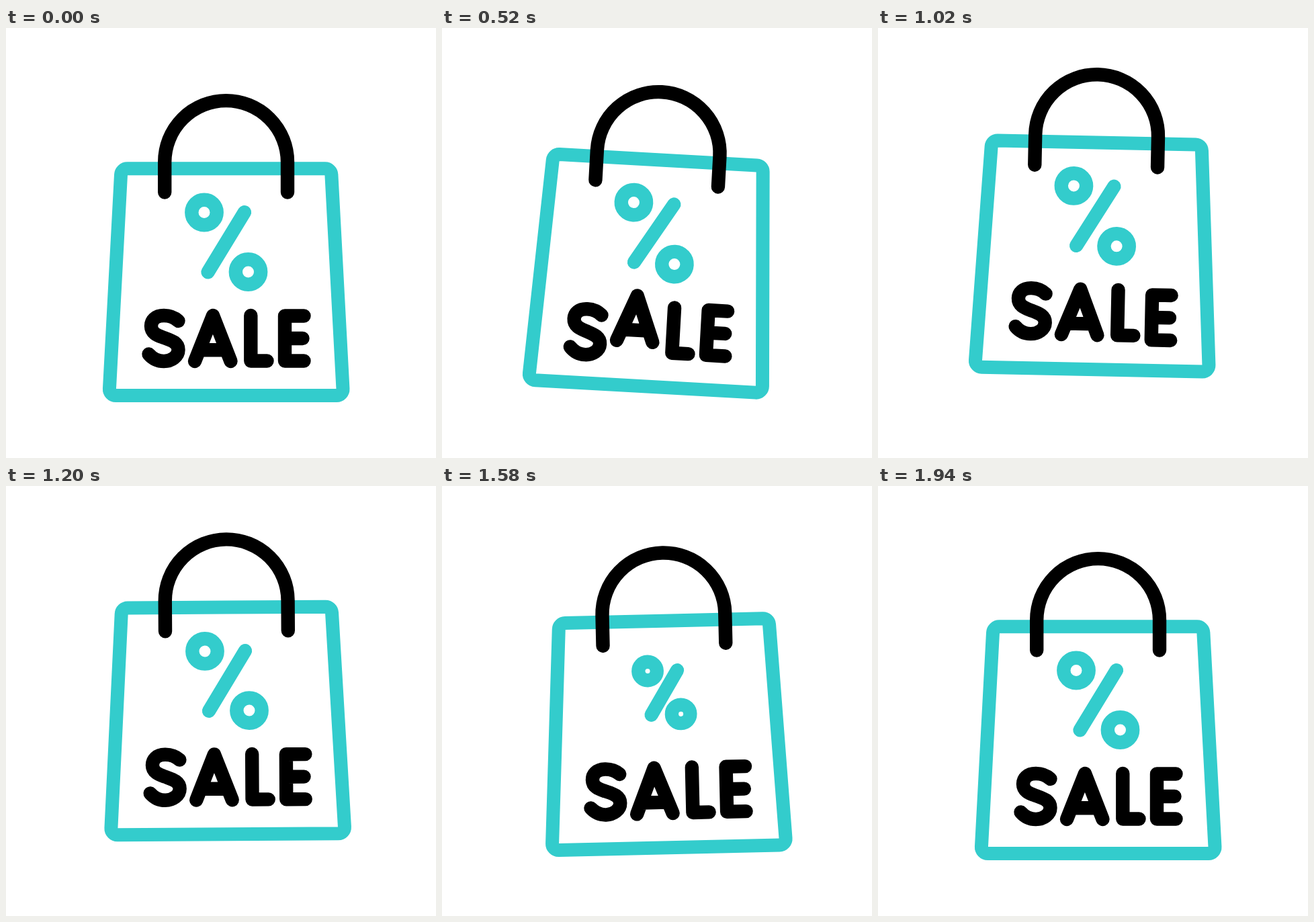
Recreate the animation shown at these times as an HTML page with a canvas. Size 640 by 640 pixels, loop 2100 ms.

```html
<!DOCTYPE html>
<html lang="en">
<head>
<meta charset="utf-8">
<title>Sale bag</title>
<style>
  html, body { margin: 0; width: 100%; height: 100%; overflow: hidden; background: #fff; }
  canvas { display: block; width: 640px; height: 640px; }
</style>
</head>
<body>
<canvas id="stage" width="640" height="640" role="img" aria-label="SALE"></canvas>
<script>
const ctx = document.getElementById('stage').getContext('2d');
const LOOP = 2100, STEP = 20, START = 120, END = 1940;
const TEAL = '#33cccc', BLACK = '#000';
const PIVOT = { x: 327.6, y: 102 };
const PERCENT = { x: 327.75, y: 318.75 };

const LETTERS = [
  'M256.5 436C250 430 242 428 235 428C222 428 216 435.5 216 443.5C216 455 227 458 235 461' +
  'C246 465 256.5 468 256.5 479C256.5 489 246 496 235 496C226 496 219 493 212.5 485.5',
  'M281 496L308 428L334.5 496M289 479.3H326',
  'M364.3 428V495.5H388.5',
  'M443.5 428.5H415V495.5H443.5M415 462H441.5'
].map(d => new Path2D(d));

const HANDLE = new Path2D('M236.2 244.5V199.5A91.4 91.4 0 0 1 419 199.5V244.5');

const clamp = u => Math.min(1, Math.max(0, u));

// Starts at rest and reaches 1 with slope m.
const easeIn = (u, m) => (3 - m) * u * u + (m - 2) * u * u * u;

// Swings from 0 to a, straight over to b, then settles at 0.
function swing(t, start, span, a, b) {
  const u = clamp((t - start) / span), k = 0.297;
  if (u < k) return a * easeIn(u / k, 0.5);
  if (u > 1 - k) return b * easeIn((1 - u) / k, 0.5);
  return a + (b - a) * (u - k) / (1 - 2 * k);
}

function lift(t) {
  const peak = 975;
  const u = t < peak ? (t - START) / (peak - START) : (END - t) / (END - peak);
  return -41.2 * easeIn(clamp(u), 1.2);
}

function stroke(path, color, width = 20) {
  ctx.strokeStyle = color;
  ctx.lineWidth = width;
  ctx.stroke(path);
}

function bagPath() {
  const p = new Path2D(), r = 9.5;
  p.moveTo(327, 209.3);
  p.arcTo(483.9, 209.3, 502, 547, r);
  p.arcTo(502, 547, 153.4, 547, r);
  p.arcTo(153.4, 547, 171.5, 209.3, r);
  p.arcTo(171.5, 209.3, 327, 209.3, r);
  p.closePath();
  return p;
}
const BAG = bagPath();

// Size changes move the parts but keep the line weight.
function drawPercent(t) {
  const start = 1210, span = 520;
  const s = 1 + swing(t, start, span, 0.13, -0.27);
  const drift = Math.sin(Math.PI * clamp((t - start) / span));
  const p = new Path2D();
  for (const side of [-1, 1]) {
    const x = side * 32.75 * s, y = side * 44.25 * s, r = 18.7 * s;
    p.moveTo(x + r, y);
    p.arc(x, y, r, 0, 2 * Math.PI);
  }
  p.moveTo(27.2 * s, -44.6 * s);
  p.lineTo(-27.2 * s, 44.6 * s);
  ctx.save();
  ctx.translate(PERCENT.x - 2.4 * drift, PERCENT.y - 3.4 * drift);
  stroke(p, TEAL, 20.4);
  ctx.restore();
}

function draw(t) {
  ctx.fillStyle = '#fff';
  ctx.fillRect(0, 0, 640, 640);
  ctx.lineCap = ctx.lineJoin = 'round';
  ctx.save();
  ctx.translate(PIVOT.x, PIVOT.y + lift(t));
  ctx.rotate(swing(t, START, END - START, 4.2, -2) * Math.PI / 180);
  ctx.translate(-PIVOT.x, -PIVOT.y);
  stroke(BAG, TEAL);
  stroke(HANDLE, BLACK, 20.4);
  drawPercent(t);
  LETTERS.forEach((letter, i) => {
    ctx.save();
    ctx.translate(0, swing(t, START + 195 * i, 500, -26, 13));
    stroke(letter, BLACK, 20.4);
    ctx.restore();
  });
  ctx.restore();
}

const begin = performance.now();
function tick() {
  const t = (performance.now() - begin) % LOOP;
  draw(Math.floor(t / STEP) * STEP);
  requestAnimationFrame(tick);
}
tick();
</script>
</body>
</html>
```
